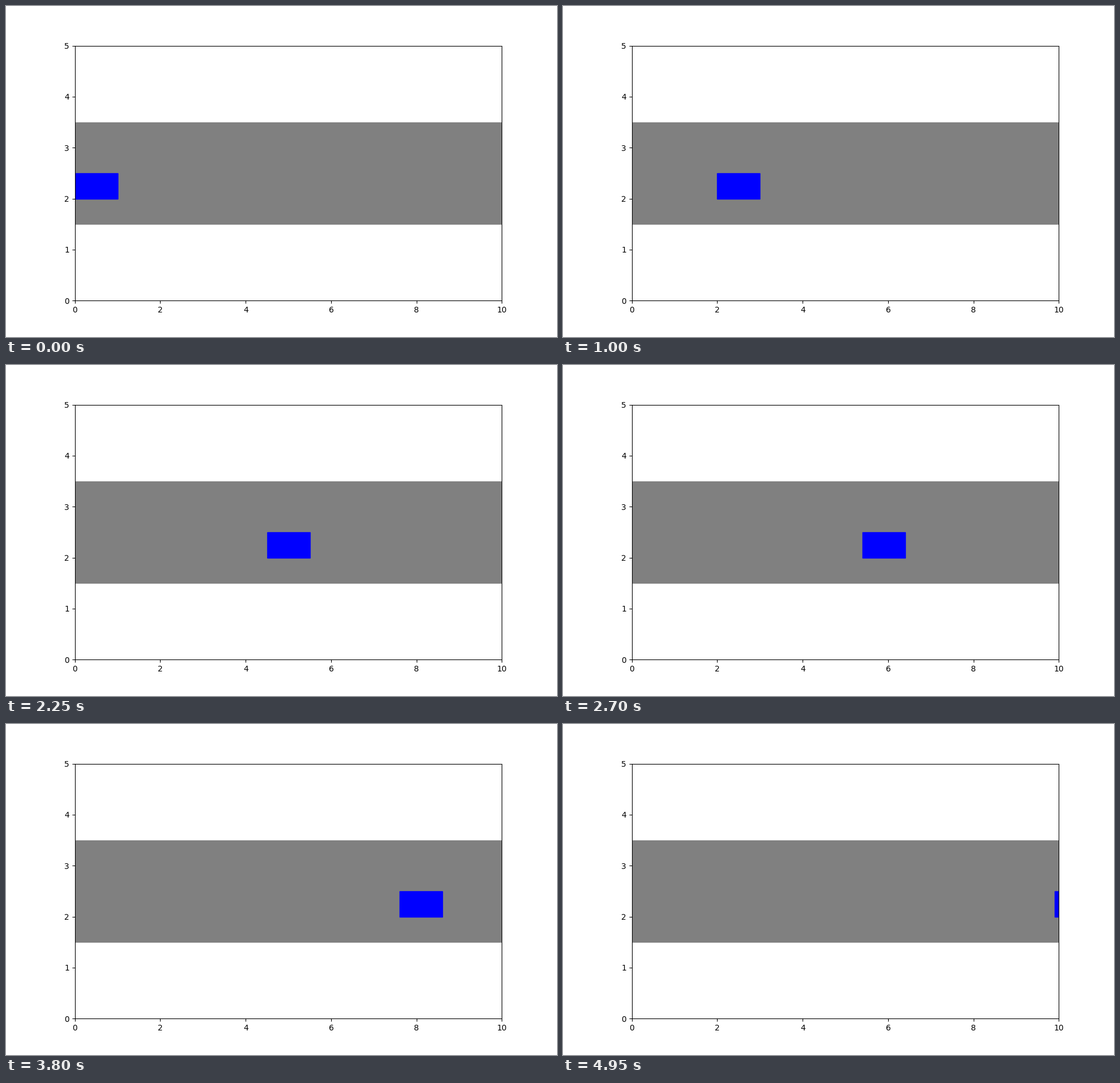
A matplotlib script for the animation above (5 s loop, 966 by 580 pixels).

```python
import matplotlib.pyplot as plt
from matplotlib.animation import FuncAnimation
from matplotlib.patches import Rectangle

WIDTH, HEIGHT, DPI = 966, 580, 100
FRAMES, INTERVAL = 100, 50
STEP = 0.1  # road units per frame

plt.rcParams["font.family"] = "DejaVu Sans"

fig, ax = plt.subplots(figsize=(WIDTH / DPI, HEIGHT / DPI), dpi=DPI)
ax.set_xlim(0, 10)
ax.set_ylim(0, 5)

road = Rectangle((0, 1.5), 10, 2, color="gray")
car = Rectangle((0, 2), 1, 0.5, color="blue")
ax.add_patch(road)
ax.add_patch(car)


def update(frame):
    car.set_x(frame * STEP)
    return (car,)


anim = FuncAnimation(fig, update, frames=FRAMES, interval=INTERVAL,
                     repeat=True, repeat_delay=0, blit=False)
plt.show()
```
